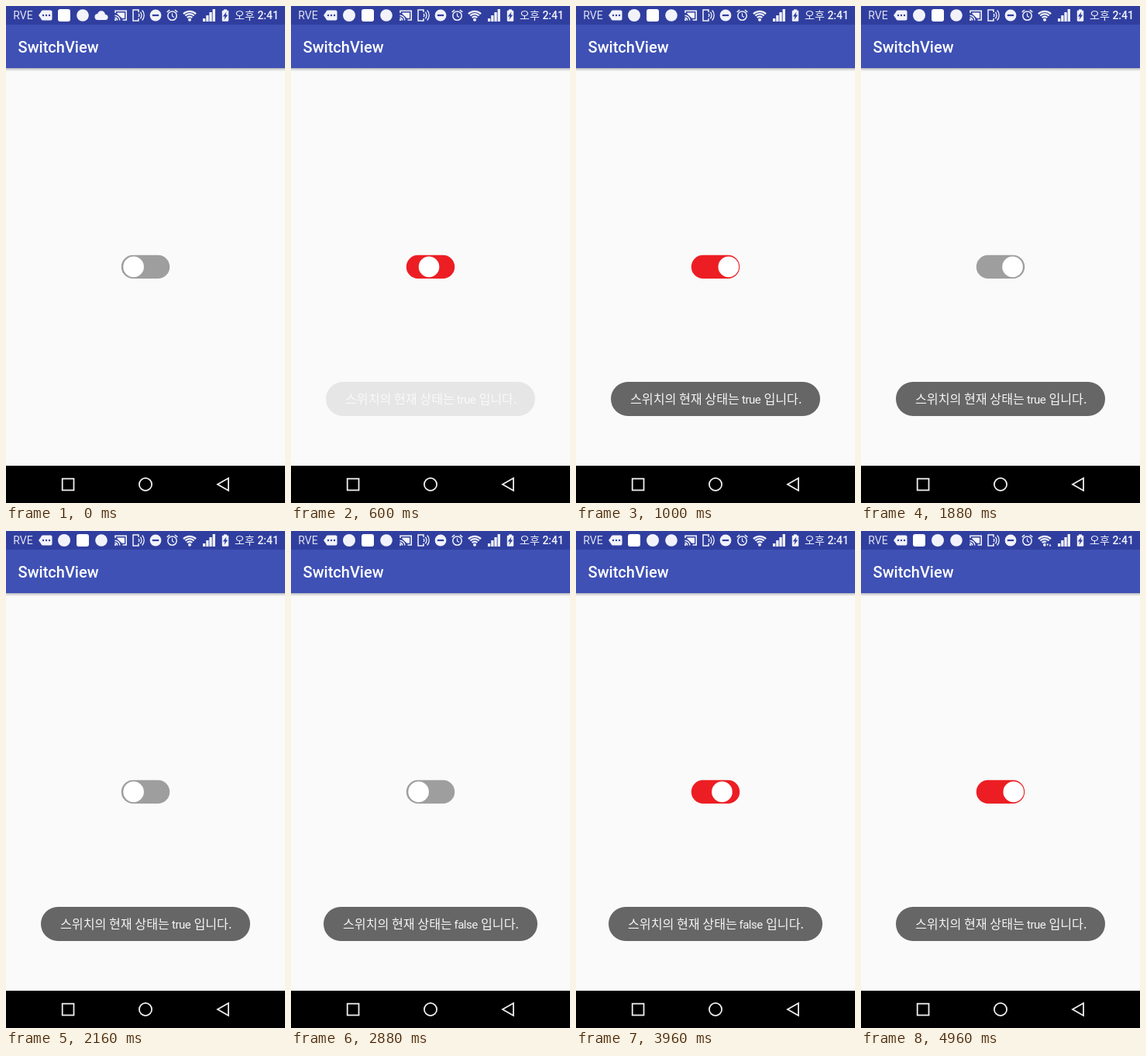
Animation, 360 px wide and 640 px high, one loop 5000 ms. Source, as an HTML page with a canvas:

```html
<!DOCTYPE html>
<html lang="ko">
<head>
<meta charset="utf-8">
<title>SwitchView</title>
<style>
  html, body { margin: 0; width: 100%; height: 100%; overflow: hidden; background: #fafafa; }
  canvas { display: block; width: 360px; height: 640px; }
</style>
</head>
<body>
<canvas id="stage"></canvas>
<script>
const LOOP = 5000, STEP = 40;
const BAR = '#303f9f', APP = '#3f51b5', PAGE = '#fafafa', ICON = '#f2f3fa';
const SANS = 'Roboto, "Noto Sans CJK KR", "Noto Sans CJK", sans-serif';
const KOREAN = '"Noto Sans CJK KR", "Noto Sans CJK", sans-serif';

const scale = window.devicePixelRatio || 1;

function surface(canvas) {
  canvas.width = 360 * scale;
  canvas.height = 640 * scale;
  const c = canvas.getContext('2d');
  c.scale(scale, scale);
  return c;
}

const screen2d = surface(document.getElementById('stage'));
let ctx = screen2d;

const clamp = v => Math.max(0, Math.min(1, v));
const span = (t, start, length) => clamp((t - start) / length);
const smooth = p => (1 - Math.cos(p * Math.PI)) / 2;
const easeIn = p => p * p;
const easeOut = p => 1 - (1 - p) * (1 - p);

function rect(x, y, w, h, color) {
  ctx.fillStyle = color;
  ctx.fillRect(x, y, w, h);
}

function round(x, y, w, h, r, color) {
  ctx.fillStyle = color;
  ctx.beginPath();
  ctx.roundRect(x, y, w, h, r);
  ctx.fill();
}

function disc(x, y, r, color) {
  ctx.fillStyle = color;
  ctx.beginPath();
  ctx.arc(x, y, r, 0, Math.PI * 2);
  ctx.fill();
}

function arc(x, y, r, from, to, width) {
  ctx.lineWidth = width;
  ctx.beginPath();
  ctx.arc(x, y, r, from * Math.PI, to * Math.PI);
  ctx.stroke();
}

function path(points, closed) {
  ctx.beginPath();
  points.forEach(([x, y]) => ctx.lineTo(x, y));
  if (closed) ctx.closePath();
}

function line(points, width, closed) {
  ctx.lineWidth = width;
  path(points, closed);
  ctx.stroke();
}

function poly(points, color) {
  ctx.fillStyle = color;
  path(points, true);
  ctx.fill();
}

function text(str, x, y, font, color, spacing = '0px') {
  ctx.font = font;
  ctx.letterSpacing = spacing;
  ctx.fillStyle = color;
  ctx.fillText(str, x, y);
}

// Notification icons, each drawn around its centre x
const notes = {
  message(x) {
    round(x - 5.5, 5.5, 14, 13, 2, ICON);
    poly([[x - 9, 12], [x - 4.5, 5.8], [x - 4.5, 18.2]], ICON);
    for (const d of [-3, 1, 5]) disc(x + d, 12, 1.2, BAR);
  },
  square(x) { round(x - 8, 4, 16, 16, 3, '#fff'); },
  mail(x) { disc(x, 12, 8, ICON); },
  chat(x) { disc(x, 12, 7.8, ICON); },
  cloud(x) {
    disc(x - 4.5, 14, 4, ICON);
    disc(x, 11.3, 5, ICON);
    disc(x + 5, 14.4, 3.5, ICON);
    rect(x - 4.5, 13, 9.5, 5, ICON);
  }
};

function noteOrder(t) {
  if (t < 80) return ['message', 'square', 'chat', 'cloud'];
  if (t < 3240) return ['message', 'mail', 'square', 'chat'];
  return ['message', 'square', 'mail', 'chat'];
}

function castIcon() {
  line([[141, 9], [141, 6.2], [155.2, 6.2], [155.2, 18], [150.5, 18]], 1.6);
  for (const r of [3.4, 6.4]) arc(140.4, 18.6, r, -0.5, 0, 1.4);
  disc(141.2, 17.8, 1.3, ICON);
  poly([[143.4, 8.6], [153, 8.6], [153, 15.8], [149.6, 15.8], [143.4, 10]], ICON);
}

function beamIcon() {
  line([[171, 8], [171, 5], [164, 5], [164, 19], [171, 19], [171, 16]], 1.5);
  for (const r of [3, 6.2, 9.4]) arc(168.8, 12, r, -0.24, 0.24, 1.3);
}

function alarmIcon() {
  arc(214.5, 12.6, 5.7, 0, 2, 1.5);
  line([[214.5, 9.2], [214.5, 13], [217, 14.6]], 1.2);
  line([[207.7, 7.8], [211.2, 5]], 1.5);
  line([[217.8, 5], [221.3, 7.8]], 1.5);
}

function wifiIcon(busy) {
  for (const r of [4.6, 8, 11.4]) arc(237, 18.2, r, -0.75, -0.25, 2.2);
  disc(237, 17.8, 2, ICON);
  if (busy) {
    rect(238.5, 13.5, 7.5, 7, BAR);
    poly([[239.4, 16.6], [242, 16.6], [240.7, 19.6]], ICON);
    poly([[242.8, 19.4], [245.4, 19.4], [244.1, 16.4]], ICON);
  }
}

function batteryIcon() {
  round(278.8, 5.8, 8.4, 14, 1, ICON);
  rect(281, 4.4, 4, 2, ICON);
  poly([[284.4, 7.4], [279.8, 13.4], [282.5, 13.4], [281.4, 18], [286.2, 11.6], [283.6, 11.6]], BAR);
}

function statusBar(t) {
  rect(0, 0, 360, 24, BAR);
  ctx.strokeStyle = ICON;
  text('RVE', 9.3, 17, '14px ' + SANS, '#e0e2f1');
  noteOrder(t).forEach((name, i) => notes[name](51 + i * 24));
  castIcon();
  beamIcon();
  disc(193, 12, 7.4, ICON);
  rect(188.8, 10.9, 8.4, 2.2, BAR);
  alarmIcon();
  wifiIcon(t >= 4040);
  for (let i = 0; i < 4; i++) rect(254 + i * 4.2, 16 - i * 4, 3.3, 4 + i * 4, ICON);
  batteryIcon();
  text('오후', 295, 17, '14px ' + KOREAN, ICON);
  text('2:41', 324.4, 17, '500 14px ' + SANS, ICON);
}

function appBar() {
  const shade = ctx.createLinearGradient(0, 80, 0, 84);
  shade.addColorStop(0, 'rgba(0,0,0,.25)');
  shade.addColorStop(1, 'rgba(0,0,0,0)');
  rect(0, 80, 360, 4, shade);
  rect(0, 24, 360, 56, APP);
  text('SwitchView', 15.6, 60, '500 20px ' + SANS, '#fff');
}

function navBar() {
  rect(0, 592, 360, 48, '#000');
  ctx.strokeStyle = '#eee';
  ctx.lineWidth = 1.8;
  ctx.strokeRect(72.7, 608.7, 14.8, 14.8);
  arc(180, 616, 8.1, 0, 2, 1.8);
  line([[273, 616], [287, 608], [287, 624]], 1.8, true);
}

function toggle(t) {
  const red = (t >= 360 && t < 1560) || t >= 3640;
  const move = start => smooth(span(t, start, 320));
  const pos = move(457) - move(1840) + move(3749);
  round(148.8, 320.8, 62.4, 30.2, 15.1, red ? '#ec1e24' : '#9e9e9e');
  disc(164.6 + 32.2 * pos, 335.9, 13.3, '#fff');
}

// A toast is painted on its own layer so that it fades as one piece
function toastLayer(value, left, word, tail) {
  const canvas = document.createElement('canvas');
  const hangul = '16.15px ' + KOREAN, color = '#f4f4f4';
  ctx = surface(canvas);
  round(left, 484, 360 - left * 2, 44, 22, '#666');
  text('스위치의 현재 상태는', left + 25, 512, hangul, color);
  text(value, word, 512, '15px ' + SANS, color, '-0.5px');
  text('입니다.', tail, 512, hangul, color);
  ctx = screen2d;
  return canvas;
}

const toastOn = toastLayer('true', 45, 214, 242.4);
const toastOff = toastLayer('false', 42, 210.5, 245);

function show(layer, alpha) {
  ctx.globalAlpha = alpha;
  ctx.drawImage(layer, 0, 0, 360, 640);
  ctx.globalAlpha = 1;
}

function toasts(t) {
  const fade = start => span(t, start, 340);
  show(toastOn, easeOut(fade(577)) - easeIn(fade(2530)));
  show(toastOff, easeOut(fade(2530)) - easeIn(fade(4575)));
  show(toastOn, easeOut(fade(4575)));
}

function draw(now) {
  const t = Math.floor((now % LOOP) / STEP) * STEP;
  rect(0, 0, 360, 640, PAGE);
  appBar();
  statusBar(t);
  toggle(t);
  toasts(t);
  navBar();
}

const begin = performance.now();
function tick() {
  draw(performance.now() - begin);
  requestAnimationFrame(tick);
}
tick();
</script>
</body>
</html>
```
